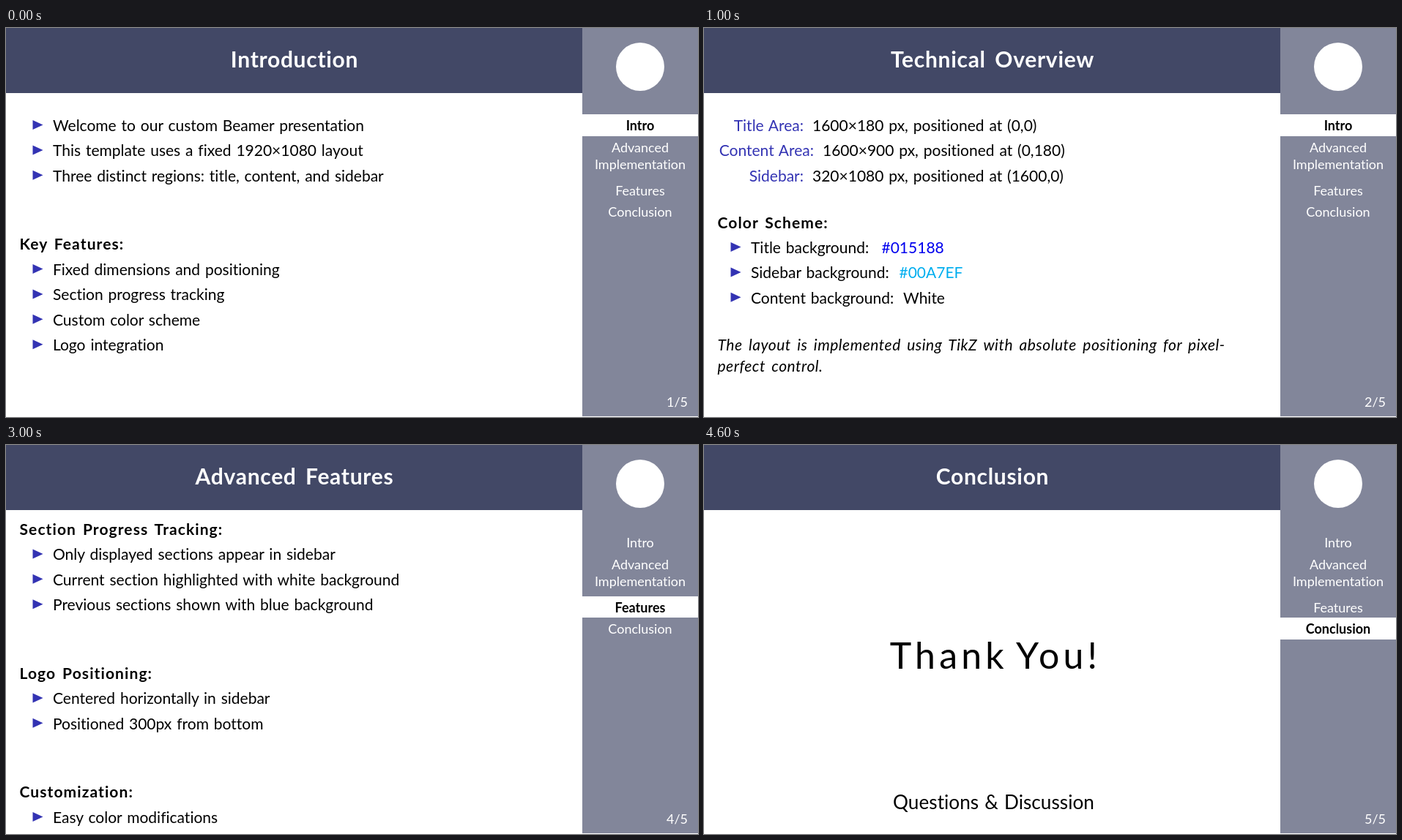
Write an HTML page that moves like this. It is 945 by 532 pixels and loops after 5000 ms.

```html
<!DOCTYPE html>
<html lang="en">
<head>
<meta charset="utf-8">
<title>Slides</title>
<style>
html, body { margin: 0; width: 100%; height: 100%; overflow: hidden; background: #fff; }
svg { display: block; font: 21px Lato, sans-serif; font-variant-ligatures: none; word-spacing: .07em; }
text { white-space: pre; }
.b { font-weight: 700; letter-spacing: .052em; word-spacing: .13em; }
.i { font-style: italic; letter-spacing: .025em; word-spacing: .14em; }
.m { font: 19.5px "Liberation Mono", monospace; word-spacing: -.19em; }
.accent { fill: #3333b3; }
.end { text-anchor: end; }
.blue { fill: #0000ee; }
.cyan { fill: #00aeef; }
.mid, .title, .nav { text-anchor: middle; }
.title { font-size: 30px; font-weight: 700; letter-spacing: .7px; word-spacing: .15em; fill: #fff; }
.nav, .page { font-size: 18px; fill: #fff; }
.on { font-weight: 700; fill: #000; }
.huge { font-size: 50px; letter-spacing: 5.2px; word-spacing: -.1em; }
.large { font-size: 26.2px; }
</style>
</head>
<body>
<svg id="stage" width="945" height="532" viewBox="0 0 945 532"></svg>
<script>
const stage = document.getElementById('stage');
const text = (x, y, s, cls = '') => `<text x="${x}" y="${y}" class="${cls}">${s}</text>`;
const rect = (x, y, w, h, fill) => `<rect x="${x}" y="${y}" width="${w}" height="${h}" fill="${fill}"/>`;
const head = (y, s) => text(18.5, y, s, 'b');
const step = 34.4;

const bullets = (y, ...items) => items.map((s, i) => {
  const base = y + i * step;
  return `<path class="accent" d="M36.5 ${base - 15}v13l14-6.5z"/>` + text(64, base, s);
}).join('');

const terms = (y, ...items) => items.map(([end, term, value], i) =>
  text(end, y + i * step, term, 'accent end') + text(end + 12, y + i * step, value)).join('');

const numbered = (y, ...items) => items.map(([term, x, value, cls], i) => {
  const base = y + i * step;
  return text(34.5, base, i + 1 + '.', 'accent') + text(64, base, term, 'b') + text(x, base, value, cls);
}).join('');

// top and height of the highlight, then the label lines
const sections = [
  [118, 30, 'Intro'],
  [148, 59, 'Advanced', 'Implementation'],
  [207, 29, 'Features'],
  [236, 30, 'Conclusion']
];

const slides = [
  { title: 'Introduction', section: 0, body:
    bullets(141, 'Welcome to our custom Beamer presentation',
      'This template uses a fixed 1920×1080 layout',
      'Three distinct regions: title, content, and sidebar') +
    head(303, 'Key Features:') +
    bullets(338, 'Fixed dimensions and positioning', 'Section progress tracking',
      'Custom color scheme', 'Logo integration') },

  { title: 'Technical Overview', section: 0, body:
    terms(141, [136, 'Title Area:', '1600×180 px, positioned at (0,0)'],
      [150, 'Content Area:', '1600×900 px, positioned at (0,180)'],
      [136, 'Sidebar:', '320×1080 px, positioned at (1600,0)']) +
    head(274, 'Color Scheme:') +
    bullets(308, 'Title background:', 'Sidebar background:', 'Content background:') +
    text(242.5, 308, '#015188', 'blue') +
    text(266.5, 342.4, '#00A7EF', 'cyan') +
    text(272, 376.8, 'White') +
    text(18.5, 441, 'The layout is implemented using TikZ with absolute positioning for pixel-', 'i') +
    text(18.5, 469.5, 'perfect control.', 'i') },

  { title: 'Implementation Details', titleY: 51, section: 1, body:
    text(18.5, 123, 'The template uses several key components:') +
    numbered(157.4, ['Custom Class File:', 267, 'beamer-template.cls', 'm'],
      ['TikZ Graphics:', 229.5, 'For precise positioning and layout'],
      ['Section Tracking:', 256.5, 'Dynamic sidebar updates'],
      ['Direct Content:', 237, 'Passed as macro argument']) +
    head(325, 'Usage Pattern:') +
    text(18.5, 382.5, '\\FullSlide{Title}{Section ID}{%', 'm') +
    text(366, 411, '% Your slide content here', 'm') +
    text(18.5, 439.5, '}', 'm') },

  { title: 'Advanced Features', section: 2, body:
    head(123, 'Section Progress Tracking:') +
    bullets(157.4, 'Only displayed sections appear in sidebar',
      'Current section highlighted with white background',
      'Previous sections shown with blue background') +
    head(320, 'Logo Positioning:') +
    bullets(354.4, 'Centered horizontally in sidebar', 'Positioned 300px from bottom') +
    head(482, 'Customization:') +
    bullets(517, 'Easy color modifications') },

  { title: 'Conclusion', section: 3, body:
    text(398, 305.5, 'Thank You!', 'mid huge') +
    text(395.5, 498, 'Questions &amp; Discussion', 'mid large') }
];

function render(n) {
  const { title, titleY = 54, section, body } = slides[n];
  const nav = sections.map(([top, h, ...lines], i) => {
    const on = i === section;
    return (on ? rect(787, top, 158, h, '#fff') : '') +
      lines.map((s, k) => text(866, top + 21.5 + k * 23, s, on ? 'nav on' : 'nav')).join('');
  }).join('');
  stage.innerHTML = rect(0, 0, 787, 89, '#424866') + text(394, titleY, title, 'title') + body +
    rect(787, 0, 158, 531, '#82869a') + '<circle cx="866" cy="53" r="33" fill="#fff"/>' + nav +
    text(931, 518, `${n + 1}/${slides.length}`, 'page end');
}

let shown = -1;
function tick() {
  const n = Math.floor(performance.now() / 1000) % slides.length;
  if (n !== shown) render(shown = n);
  requestAnimationFrame(tick);
}
tick();
</script>
</body>
</html>
```
